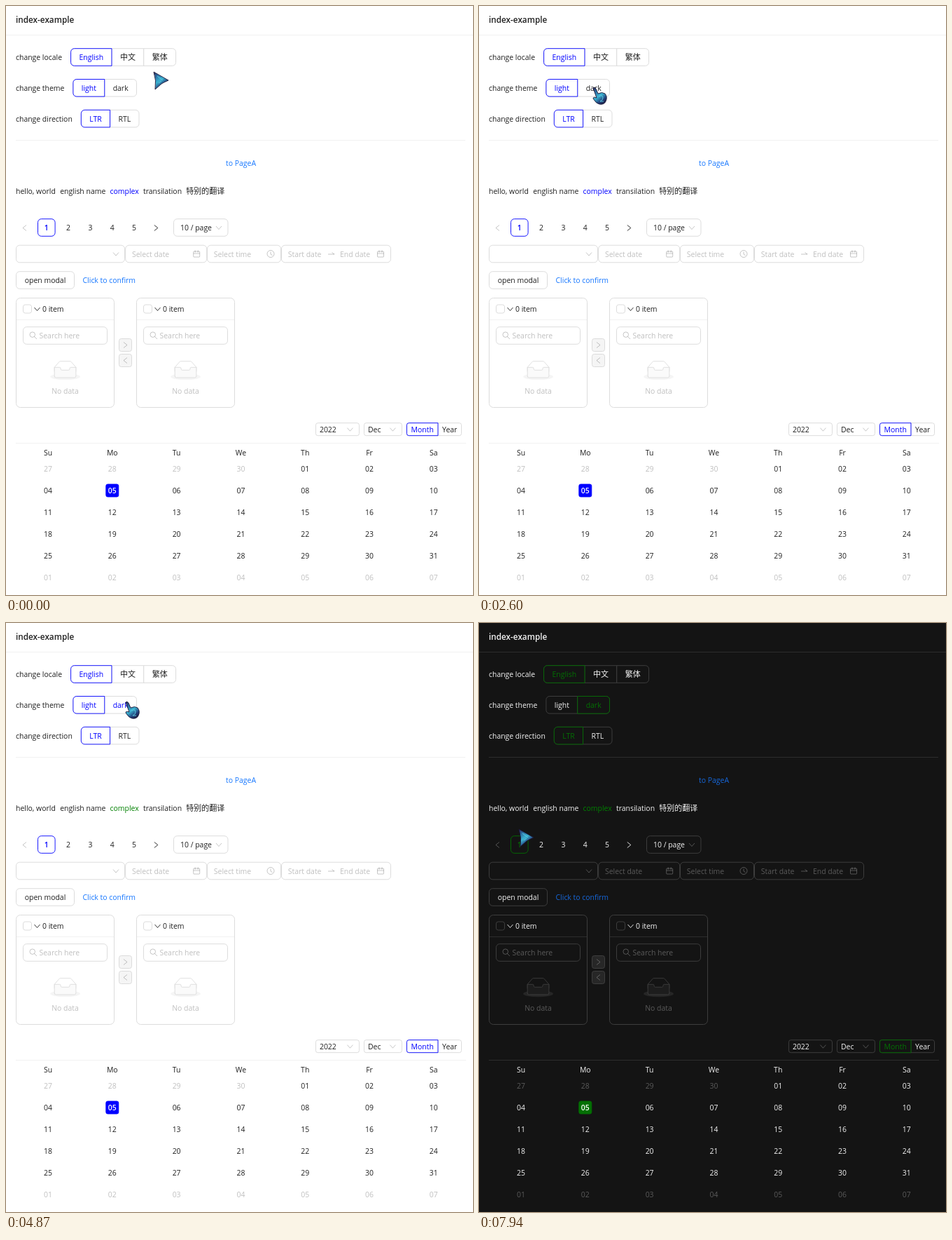
Write an HTML page with a canvas that moves like this. It is 667x840 px and loops after 8 s.

```html
<!DOCTYPE html>
<html lang="en">
<head>
<meta charset="utf-8">
<title>index-example</title>
<style>
  html, body { margin: 0; width: 100%; height: 100%; overflow: hidden; }
  canvas { display: block; }
</style>
</head>
<body>
<canvas id="stage" width="667" height="840"></canvas>
<script>
const LOOP = 8000;
const LEFT = 14, RIGHT = 657, MIRROR = LEFT + RIGHT;
const CONTROL = 24.6; // height of buttons and inputs
const GAP = 12.5;
const ctx = document.getElementById('stage').getContext('2d');

const LOCALES = {
  en: {
    labels: ['change locale', 'change theme', 'change direction'], link: 'to PageA',
    words: ['hello, world', 'english name', 'complex', 'transilation', '特别的翻译'],
    perPage: '10 / page', fields: ['Select date', 'Select time', 'Start date', 'End date'],
    modal: 'open modal', confirm: 'Click to confirm',
    items: '0 item', search: 'Search here', empty: 'No data',
    year: '2022', month: 'Dec', modes: ['Month', 'Year'],
    days: ['Su', 'Mo', 'Tu', 'We', 'Th', 'Fr', 'Sa'], firstDay: -3, cjk: 'SC'
  },
  cn: {
    labels: ['切换语言', '切换主题', '切换方向'], link: '跳转PageA',
    words: ['你好，世界', '中文名', '复杂的', '翻译', '特别的翻译'],
    perPage: '10 条/页', fields: ['请选择日期', '请选择时间', '开始日期', '结束日期'],
    modal: '打开模态框', confirm: '点击确认',
    items: '0 项', search: '请输入搜索内容', empty: '暂无数据',
    year: '2022年', month: '12月', modes: ['月', '年'],
    days: ['Su', 'Mo', 'Tu', 'We', 'Th', 'Fr', 'Sa'], firstDay: -3, cjk: 'SC'
  },
  tw: {
    labels: ['切換語言', '切換主題', '切換方向'], link: '跳轉PageA',
    words: ['你好，世界（繁體）', '中文名（繁體）', '複雜的', '翻譯', '特别的翻译'],
    perPage: '10 條/頁', fields: ['請選擇日期', '請選擇時間', '開始日期', '結束日期'],
    modal: '打開模態框', confirm: '點擊確認',
    items: '0 項目', search: '搜尋資料', empty: '無此資料',
    year: '2022年', month: '12月', modes: ['月', '年'],
    days: [...'一二三四五六日'], firstDay: -2, cjk: 'TC'
  }
};

// [light, dark]
const PALETTE = {
  bg: ['#ffffffff', '#141414ff'],
  text: ['#000000e0', '#fffffff2'],
  faint: ['#00000040', '#ffffff4c'],
  border: ['#d9d9d9ff', '#424242ff'],
  split: ['#f0f0f0ff', '#303030ff'],
  link: ['#1677ffff', '#1668dcff'],
  primary: ['#0000ffff', '#037003ff'],
  button: ['#f5f5f5ff', '#272727ff'],
  shadow: ['#f5f5f5ff', '#262626ff'],
  tray: ['#fafafaff', '#1d1d1dff']
};

// time, state from then on
const LOCALE_STEPS = [[0, 'en'], [420, 'cn'], [1250, 'tw'], [1900, 'en']];
const THEME_STEPS = [[0, 0], [3130, 1], [4380, 0], [5070, 1]];
const ACCENT_STEPS = [[0, '#0000ff'], [2950, '#008000'], [4150, '#0000ff'], [4850, '#008000']];
const RTL_STEPS = [[0, false], [5990, true], [6500, false]];

// Places the pointer visits: arrival time, x, y
const VISITS = [
  [0, 212, 94], [400, 165, 72], [1120, 197, 76], [1710, 110, 75], [2600, 164, 118], [3140, 174, 121],
  [3910, 124, 122], [4870, 172, 114], [5990, 168, 166], [6340, 541, 170],
  [7000, 470, 290], [7570, 194, 228], [7940, 58, 294]
];

const clamp = v => Math.max(0, Math.min(1, v));
const stepAt = (steps, t) => steps.findLast(s => s[0] <= t);
const channels = hex => hex.match(/\w\w/g).map(h => parseInt(h, 16));

function blend(k) {
  return Object.fromEntries(Object.entries(PALETTE).map(([name, pair]) => {
    const [a, b] = pair.map(channels);
    const [red, green, blue, alpha] = a.map((v, i) => v + (b[i] - v) * k);
    return [name, `rgba(${red}, ${green}, ${blue}, ${alpha / 255})`];
  }));
}

function pointerAt(t) {
  const i = VISITS.findIndex(v => v[0] > t);
  const [, x, y] = VISITS.at(i < 0 ? -1 : i);
  if (i < 1) return { x, y };
  const [left, fromX, fromY] = VISITS[i - 1], arrive = VISITS[i][0];
  const depart = Math.max(left, arrive - 150 - Math.hypot(x - fromX, y - fromY));
  const k = clamp((t - depart) / (arrive - depart)), eased = k * k * (3 - 2 * k);
  return { x: fromX + (x - fromX) * eased, y: fromY + (y - fromY) * eased };
}

let L, rtl, now, lag; // now: colours that switch at once, lag: colours that fade
let pointer, hover, overControl;

// Runs draw around (x, y) without mirroring
function upright(x, y, draw) {
  ctx.save();
  ctx.translate(x, y);
  if (rtl) ctx.scale(-1, 1);
  draw();
  ctx.restore();
}

function setFont(s, weight = 400, size = 10.45) {
  if (/[\u4e00-\u9fa5]/.test(s)) size = 11;
  ctx.font = `${weight} ${size}px "Open Sans", "Noto Sans CJK ${L.cjk}", "Noto Sans CJK SC", "Noto Sans CJK JP", sans-serif`;
}

function widthOf(s) {
  setFont(s);
  return ctx.measureText(s).width;
}

function text(s, x, y, color, align = 'left', weight, size) {
  if (rtl && /^\d+ /.test(s)) s = s.split(' ').reverse().join(' ');
  upright(x, y + 4, () => {
    setFont(s, weight, size);
    ctx.fillStyle = color;
    ctx.textAlign = rtl && align === 'left' ? 'right' : align;
    ctx.fillText(s, 0, 0);
  });
}

// Rounded box given by its left end, width, vertical centre and height
function box(x, width, y, height, radius, stroke, fill) {
  ctx.beginPath();
  ctx.roundRect(x, y - height / 2, width, height, radius);
  if (fill) { ctx.fillStyle = fill; ctx.fill(); }
  if (stroke) { ctx.strokeStyle = stroke; ctx.stroke(); }
}

const control = (x, width, y, fill = lag.bg) => box(x, width, y, CONTROL, 5, lag.border, fill);

function lines(color, ...paths) {
  ctx.strokeStyle = color;
  ctx.beginPath();
  for (const p of paths)
    for (let i = 0; i < p.length; i += 2) ctx[i ? 'lineTo' : 'moveTo'](p[i], p[i + 1]);
  ctx.stroke();
}

const rule = (x1, x2, y) => lines(now.split, [x1, y, x2, y]);
const chevronDown = (x, y, color) => lines(color, [x - 4, y - 2, x, y + 2.5, x + 4, y - 2]);
const chevronSide = (x, y, dir, color) => lines(color, [x - 2.5 * dir, y - 4, x + 2.5 * dir, y, x - 2.5 * dir, y + 4]);

function calendarIcon(x, y) {
  box(x - 4.5, 9, y + .5, 8, 1, now.faint);
  lines(now.faint, [x - 4.5, y - .5, x + 4.5, y - .5], [x - 2, y - 5, x - 2, y - 2], [x + 2, y - 5, x + 2, y - 2]);
}

function clockIcon(x, y) {
  box(x - 5, 10, y, 10, 5, now.faint);
  lines(now.faint, [x, y - 3, x, y + .5, x + 2.5, y + 2]);
}

const radioWidths = (names, padding) => names.map(name => widthOf(name) + padding);

function radios(names, x, y, height, padding, radius, selected) {
  const last = names.length - 1;
  const inside = (p, left, width) => p.x > left && p.x < left + width && Math.abs(p.y - y) < height / 2;
  const segments = radioWidths(names, padding).map((width, i) => {
    const start = i ? 0 : radius, end = i < last ? 0 : radius;
    const segment = { left: x, width, draw: stroke => box(segment.left, width, y, height, [start, end, end, start], stroke, lag.bg) };
    x += width;
    return segment;
  });
  segments.forEach(s => s.draw(lag.border));
  segments[selected].draw(lag.primary);
  segments.forEach(({ left, width }, i) => {
    overControl ||= inside(pointer, left, width);
    const active = i === selected || inside(hover, left, width);
    text(names[i], left + width / 2, y, active ? lag.primary : lag.text, 'center');
  });
}

function settings(locale, dark) {
  const groups = [
    [['English', '中文', '繁体'], Object.keys(LOCALES).indexOf(locale)],
    [['light', 'dark'], dark],
    [['LTR', 'RTL'], +rtl]
  ];
  groups.forEach(([names, selected], i) => {
    const y = 73 + i * 43.8;
    text(L.labels[i], LEFT, y, now.text);
    radios(names, LEFT + widthOf(L.labels[i]) + (rtl ? .5 : GAP), y, CONTROL, 23.8, 5, selected);
  });
}

function sentence(accent) {
  let x = LEFT;
  L.words.forEach((word, i) => {
    text(word, x, 264, i === 2 ? accent : now.text);
    x += widthOf(word) + 6.3;
  });
}

function pagination() {
  const y = 316, pageX = n => 26.5 + n * 31.3;
  chevronSide(pageX(0), y + .5, -1, now.faint);
  box(pageX(1) - CONTROL / 2, CONTROL, y, CONTROL, 5, now.primary, now.bg);
  for (let n = 1; n <= 5; n++)
    text(String(n), pageX(n), y, n === 1 ? now.primary : now.text, 'center', n === 1 ? 600 : 400);
  chevronSide(pageX(6), y + .5, 1, now.text);
  const x = 239.5, width = widthOf(L.perPage) + 32.5;
  control(x, width, y);
  text(L.perPage, x + 9.5, y, lag.text);
  chevronDown(x + width - 13, y, now.faint);
}

function fields() {
  const y = 353.5;
  const [date, time, from, to] = L.fields;
  const picker = (x, width, label, icon) => {
    control(x, width, y, now.bg);
    text(label, x + 9.3, y, now.faint);
    icon(x + width - 14.5, y);
  };
  control(14.5, 155, y);
  chevronDown(157, y, now.faint);
  picker(170.7, 116, date, calendarIcon);
  picker(287.5, 105, time, clockIcon);
  picker(393.5, 156, from, calendarIcon);
  lines(now.faint, [460, y + .5, 469, y + .5, 465.5, y - 2]);
  text(to, 477, y, now.faint);
}

function actions() {
  const y = 391, width = widthOf(L.modal) + 24.5;
  control(LEFT + .5, width, y);
  text(L.modal, LEFT + .5 + width / 2, y, lag.text, 'center');
  text(L.confirm, LEFT + width + (rtl ? .5 : GAP), y, now.link);
}

function emptyTray(x, y) {
  ctx.save();
  ctx.translate(x - 21.3, y);
  ctx.scale(.667, .667);
  ctx.lineWidth = 1.2;
  ctx.fillStyle = now.shadow;
  ctx.beginPath();
  ctx.ellipse(32, 34, 32, 7, 0, 0, 7);
  ctx.fill();
  ctx.strokeStyle = now.border;
  ctx.stroke(new Path2D('M9 23V13.8L19.1 2.3Q20 1 21.1 1H42.9Q44 1 44.9 2.3L55 13.8V23'));
  const tray = new Path2D('M9 14H20.2Q22.4 14 22.4 17T24.6 19.9H39.4Q41.6 19.9 41.6 17T43.8 14H55V32Q55 36 52 36H12Q9 36 9 32Z');
  ctx.fillStyle = now.tray;
  ctx.fill(tray);
  ctx.stroke(tray);
  ctx.restore();
}

function transferList(x) {
  const middle = x + 70.5;
  box(x + .5, 140, 494.5, 156, 6, now.border);
  rule(x + 1, x + 140, 447.5);
  box(x + 10.5, 12, 432, 12, 3, lag.border, lag.bg);
  chevronDown(x + 30.5, 432, now.text);
  text(L.items, x + 38, 432, now.text);
  control(x + 10.5, 120, 470);
  upright(x + 25, 469.5, () => {
    box(-5, 7.5, -.8, 7.5, 4, now.faint);
    lines(now.faint, [1.5, 2, 5, 5.5]);
  });
  text(L.search, x + 33.5, 470, now.faint);
  emptyTray(middle, 506);
  text(L.empty, middle, 549, now.faint, 'center');
}

function transfer() {
  transferList(LEFT);
  transferList(LEFT + 172);
  for (const dir of [1, -1]) {
    const y = 494.5 - 11 * dir;
    box(161.5, 18, y, 18, 3, lag.border, now.button);
    chevronSide(170.5, y, dir, lag.faint);
  }
}

function calendarHeader() {
  const y = 603.7, height = 18, padding = 12.3;
  const modesX = 650.5 - radioWidths(L.modes, padding).reduce((a, b) => a + b);
  const select = (label, x, width) => {
    box(x, width, y, height, 3, lag.border, lag.bg);
    text(label, x + 5.5, y, lag.text);
    chevronDown(x + width - 13, y, now.faint);
  };
  select(L.year, modesX - 130, 62);
  select(L.month, modesX - 61, 54);
  radios(L.modes, modesX, y, height, padding, 3, 0);
  rule(LEFT, RIGHT, 623.5);
}

function calendar() {
  const columnX = i => 60 + i * 91.8;
  L.days.forEach((day, i) => text(day, columnX(i), 637, now.text, 'center'));
  for (let i = 0; i < 42; i++) {
    const day = L.firstDay + i, today = day === 5;
    const x = columnX(i % 7), y = 659.5 + Math.floor(i / 7) * 31;
    const shown = day < 1 ? day + 30 : day > 31 ? day - 31 : day;
    if (today) box(x - 9, 18, y + .5, 18, 2.5, now.primary, lag.primary);
    const color = today ? '#fff' : shown === day ? now.text : now.faint;
    text(String(shown).padStart(2, '0'), x, y, color, 'center', today ? 600 : 400);
  }
}

function drawPointer() {
  ctx.save();
  ctx.translate(pointer.x - 1, pointer.y - (overControl ? 2 : 0));
  const paint = ctx.createLinearGradient(0, 0, 18, 24);
  ['#2a2558', '#2b6fa5', '#3cb4d2', '#23407c', '#151029'].forEach((tone, i) => paint.addColorStop(i / 4, tone));
  const shape = new Path2D(overControl
    ? 'M0 1Q2-1 4 2L7 9Q13 6 17 9Q21 14 18 20Q16 25 9 24Q4 23 0 16Q0 13 5 15Z'
    : 'M0 0L21 12Q14 15 11 17L2 25Q4 12 0 0Z');
  ctx.fillStyle = paint;
  ctx.fill(shape);
  ctx.lineJoin = 'round';
  ctx.strokeStyle = '#1c1636';
  ctx.stroke(shape);
  ctx.strokeStyle = '#5fd3e4';
  ctx.stroke(new Path2D(overControl ? 'M8 13Q13 10 14 14T10 20H15' : 'M5 6L13 12M7 16L11 13'));
  ctx.restore();
}

function render(t) {
  const locale = stepAt(LOCALE_STEPS, t)[1];
  const [since, dark] = stepAt(THEME_STEPS, t);
  const faded = since ? clamp((t - since - 40) / 220) : 1;
  L = LOCALES[locale];
  rtl = stepAt(RTL_STEPS, t)[1];
  now = blend(dark);
  lag = blend(dark ? faded : 1 - faded);
  const mirrored = p => rtl ? { x: MIRROR - p.x, y: p.y } : p;
  pointer = mirrored(pointerAt(t));
  hover = mirrored(pointerAt(t - 90)); // hover colours trail the pointer
  overControl = false;

  ctx.setTransform(1, 0, 0, 1, 0, 0);
  ctx.lineWidth = .9;
  ctx.fillStyle = now.bg;
  ctx.fillRect(0, 0, 667, 840);
  if (rtl) ctx.setTransform(-1, 0, 0, 1, MIRROR, 0);

  text('index-example', LEFT, 20, now.text, 'left', 600, 11.75);
  rule(0, MIRROR, 41.5);
  settings(locale, dark);
  rule(LEFT, RIGHT - 1, 191.5);
  text(L.link, MIRROR / 2, 224, now.link, 'center');
  sentence(stepAt(ACCENT_STEPS, t)[1]);
  pagination();
  fields();
  actions();
  transfer();
  calendarHeader();
  calendar();

  ctx.setTransform(1, 0, 0, 1, 0, 0);
  pointer = pointerAt(t);
  drawPointer();
}

const start = performance.now();
function frame() {
  render((performance.now() - start) % LOOP);
  requestAnimationFrame(frame);
}
frame();
</script>
</body>
</html>
```
